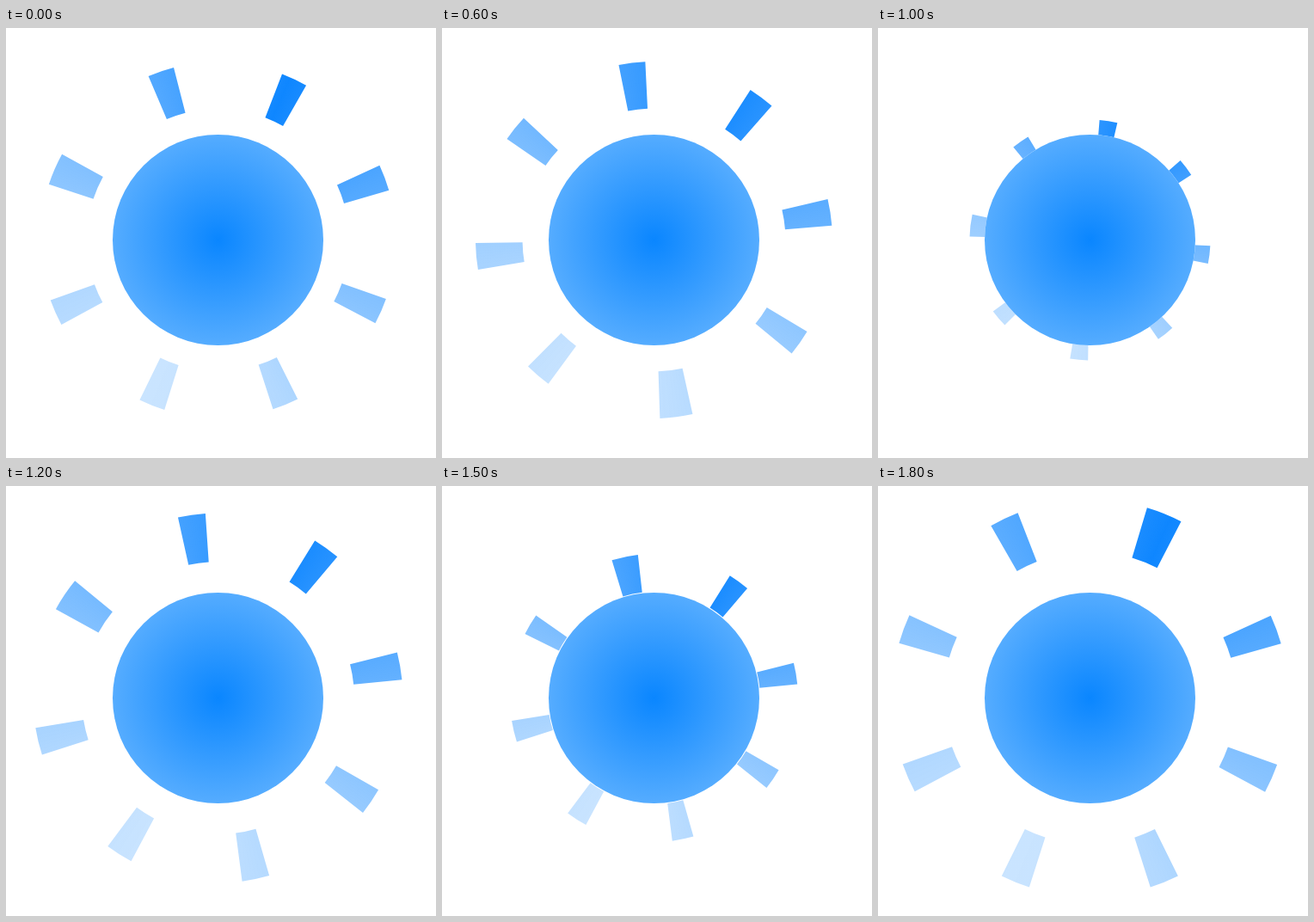
Recreate the animation shown at these times as an HTML page with a canvas. Size 500x500 px, loop 2 s.

```html
<!DOCTYPE html>
<html lang="en">
<head>
<meta charset="utf-8">
<title>Pulsing sun</title>
<style>
  html, body { margin: 0; width: 100%; height: 100%; overflow: hidden; background: #fff; }
  canvas { display: block; width: 500px; height: 500px; }
</style>
</head>
<body>
<canvas id="stage" width="500" height="500"></canvas>
<script>
const ctx = document.getElementById('stage').getContext('2d');
const LOOP = 2000, STEP = 100;
const C = 246.5, DISC = 122.5, INNER = 0.737;
const RAD = Math.PI / 180;

// [ms, outer radius of the rays]: peaks and troughs of the pulse
const PULSE = [[0, 207], [270, 100], [600, 207.5], [900, 115],
               [1200, 215], [1420, 160], [1800, 231]];
// [ms, bearing of the wide ray]: the spin rests at each peak
const SPIN = [[0, 293.5], [600, 532.8], [1200, 664], [1800, 742]];

const sine = p => (1 - Math.cos(Math.PI * p)) / 2;
const earlySine = p => sine(p ** 0.88);

// Eased value between key points, held after the last one
function at(keys, t, ease) {
  const i = keys.findIndex(([time]) => time > t);
  if (i < 0) return keys[keys.length - 1][1];
  const [t0, v0] = keys[i - 1], [t1, v1] = keys[i];
  return v0 + (v1 - v0) * ease((t - t0) / (t1 - t0));
}

// Fixed light: strongest at 24 degrees right of the top, fading round both sides
function rayPaint() {
  const g = ctx.createConicGradient((24 - 90) * RAD, C, C);
  for (let i = 0; i <= 48; i++) {
    const side = Math.abs(1 - i / 24);
    g.addColorStop(i / 48, `rgba(10,132,255,${0.22 + 0.76 * side ** 1.5})`);
  }
  return g;
}

function discPaint() {
  const g = ctx.createRadialGradient(C, C, 0, C, C, DISC);
  g.addColorStop(0, '#0a86ff');
  g.addColorStop(1, '#55acff');
  return g;
}

const rayFill = rayPaint(), discFill = discPaint();

function drawRay(bearing, half, r) {
  const a = (bearing - half - 90) * RAD, b = (bearing + half - 90) * RAD;
  ctx.beginPath();
  ctx.arc(C, C, r, a, b);
  ctx.arc(C, C, r * INNER, b, a, true);
  ctx.closePath();
  ctx.fill();
}

function draw(now) {
  const t = Math.floor((now % LOOP) / STEP) * STEP;
  const r = at(PULSE, t, sine), turn = at(SPIN, t, earlySine);
  ctx.clearRect(0, 0, 500, 500);

  // One wide ray, then seven narrow ones 44.1 degrees apart
  ctx.fillStyle = rayFill;
  drawRay(turn, 5.3, r);
  for (let k = 0; k < 7; k++) drawRay(turn + 47.8 + 44.1 * k, 4.3, r);

  ctx.fillStyle = '#fff';
  ctx.beginPath();
  ctx.arc(C, C, DISC, 0, 2 * Math.PI);
  ctx.fill();
  ctx.fillStyle = discFill;
  ctx.fill();
}

const start = performance.now();
function tick() {
  draw(performance.now() - start);
  requestAnimationFrame(tick);
}
tick();
</script>
</body>
</html>
```
